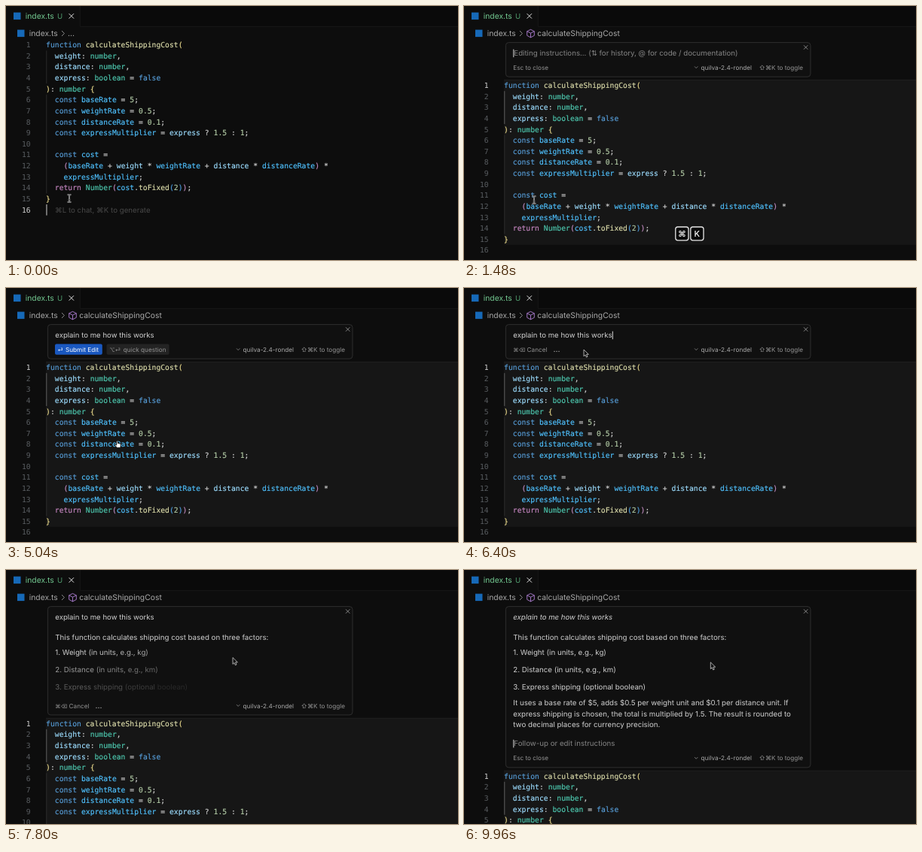
These frames come from a looping animation (600 px wide and 338 px high, 10000 ms). An HTML page:

```html
<!DOCTYPE html>
<html lang="en">
<head>
<meta charset="utf-8">
<title>Inline code question</title>
<style>
html, body { margin: 0; width: 100%; height: 100%; overflow: hidden; background: #0d0d0d; }
svg { display: block; width: 100vw; height: 100vh; }
text { white-space: pre; font-family: Inter, "DejaVu Sans", sans-serif; text-rendering: geometricPrecision; }
.code { font: 9.725px "DejaVu Sans Mono", monospace; stroke-width: 0.15; }
.body { font-size: 9.72px; fill: #d0d0d0; }
.small { font-size: 8.2px; fill: #929292; }
.glyph { font-size: 7.3px; fill: #929292; }
.tab { font-size: 10.35px; fill: #a9a9a9; }
</style>
</head>
<body>
<svg id="stage" viewBox="0 0 600 338"></svg>
<script>
const LOOP = 10000, STEP = 40;
const CHAR = 5.855, ROW = 14.62, LEFT = 53.1, TOP = 44.7;
const T = { grab: 120, top: 520, keys: 960, open: 1100, keysOff: 2160, type: 2870, hover: 4800, ask: 5960, answer: 6953, done: 8940 };
const KEY_MS = 60, CPS = 190, FADE = 500;
const PROMPT = "explain to me how this works";

const SRC = `function calculateShippingCost(
  weight: number,
  distance: number,
  express: boolean = false
): number {
  const baseRate = 5;
  const weightRate = 0.5;
  const distanceRate = 0.1;
  const expressMultiplier = express ? 1.5 : 1;

  const cost =
    (baseRate + weight * weightRate + distance * distanceRate) *
    expressMultiplier;
  return Number(cost.toFixed(2));
}
`.split("\n");

const ANSWER = [
  [89.2, "This function calculates shipping cost based on three factors:"],
  [110, "1. Weight (in units, e.g., kg)"],
  [132.6, "2. Distance (in units, e.g., km)"],
  [155.3, "3. Express shipping (optional boolean)"],
  [177, "It uses a base rate of $5, adds $0.5 per weight unit and $0.1 per distance unit. If"],
  [191.3, "express shipping is chosen, the total is multiplied by 1.5. The result is rounded to"],
  [205.8, "two decimal places for currency precision."]
];

function el(parent, tag, attrs = {}, text) {
  const n = document.createElementNS("http://www.w3.org/2000/svg", tag);
  for (const k in attrs) n.setAttribute(k, attrs[k]);
  if (text !== undefined) n.textContent = text;
  parent.appendChild(n);
  return n;
}
const group = p => el(p, "g");
const rect = (p, x, y, width, height, fill, more) => el(p, "rect", { x, y, width, height, fill, ...more });
const path = (p, d, stroke, more) => el(p, "path", { d, stroke, fill: "none", ...more });
const label = (p, x, y, cls, text, more) => el(p, "text", { x, y, class: cls, ...more }, text);
const show = (n, on) => n.setAttribute("display", on ? "inline" : "none");
const shift = (n, x, y) => n.setAttribute("transform", `translate(${x} ${y})`);
const clamp = v => Math.max(0, Math.min(1, v));

const svg = document.getElementById("stage");
rect(svg, 0, 0, 600, 338, "#0d0d0d");

// Code pane
const code = group(svg);
const region = group(code);
rect(region, 53, TOP, 547, ROW * 15, "#161616");
path(region, `M53 ${TOP}H600`, "#242424", { "stroke-width": 0.8 });
const marks = SRC.map((s, i) =>
  rect(code, LEFT, TOP + i * ROW, (s.length + (i < 14 ? 1 : 0)) * CHAR, ROW + 0.1, "#264f78"));
const guide = (a, b) => path(code, `M53.8 ${TOP + a * ROW}V${TOP + b * ROW}`, "#2e2e2e", { "stroke-width": 0.9 });
const params = guide(1, 4);
guide(5, 14);

const RULES = /(\b(?:function|const|false)\b)|(\breturn\b)|(\b(?:number|boolean|Number)\b)|(\b(?:calculateShippingCost|toFixed)\b)|(\b(?:weight|distance|express)\b)|([a-z]\w+)|(\d[\d.]*)|[^]/g;
const TONES = ["#569cd6", "#c586c0", "#4ec9b0", "#dcdcaa", "#9cdcfe", "#4fc1ff", "#b5cea8"];
const BRACKETS = ["#efdf8e", "#c78fc6", "#4fa3e8"];
let depth = 0;
function tone(m) {
  if ("({".includes(m[0])) return BRACKETS[depth++];
  if (")}".includes(m[0])) return BRACKETS[--depth];
  const i = m.slice(1).findIndex(Boolean);
  return i < 0 ? "#d4d4d4" : TONES[i];
}
const numbers = SRC.map((s, i) => {
  const y = TOP + i * ROW + 10.5;
  const line = label(code, LEFT, y, "code", "");
  for (const m of s.matchAll(RULES)) {
    const fill = tone(m);
    el(line, "tspan", { fill, stroke: fill }, m[0]);
  }
  return label(code, 32.6, y, "code", i + 1, { "text-anchor": "end" });
});
const hint = label(code, 65, TOP + 15 * ROW + 10.6, "body", "⌘L to chat, ⌘K to generate", { style: "fill:#484848" });
const bar = rect(code, 53.4, 0, 1.1, ROW, "#bdbdbd");

// Tab and breadcrumb
rect(svg, 98, 0, 502, 27, "#0a0a0a");
path(svg, "M98.3 0V27.3H600", "#1b1b1b", { "stroke-width": 0.8 });
rect(svg, 10, 8.6, 9.5, 9.5, "#1669b8");
label(svg, 25.7, 17, "tab", "index.ts", { style: "fill:#73c991" });
label(svg, 68, 16.6, "tab", "U", { style: "fill:#4f9a6c;font-size:9.6px" });
path(svg, "M83.6 10.2l6.4 6.4M90 10.2l-6.4 6.4", "#e0e0e0");
rect(svg, 15, 31.6, 9.5, 9.5, "#1669b8");
label(svg, 30.7, 40, "tab", "index.ts");
path(svg, "M74 33l3.4 3.5-3.4 3.5", "#999", { "stroke-width": 0.9 });
const dots = label(svg, 82, 40, "tab", "...");
const crumb = group(svg);
path(crumb, "M88.5 31.3l4.8 2.4v5.6l-4.8 2.6-4.8-2.6v-5.6zM83.7 33.7l4.8 2.4 4.8-2.4M88.5 36.1v5.8", "#b180d7", { "stroke-width": 0.9 });
label(crumb, 97.3, 40, "tab", "calculateShippingCost");

// Prompt box
const box = group(svg);
const frame = rect(box, 55.4, 48.6, 404.6, 45.4, "#101010", { rx: 4, stroke: "#323232", "stroke-width": 0.9 });
path(box, "M451 52.3l5.4 5.4M456.4 52.3l-5.4 5.4", "#a0a0a0", { "stroke-width": 0.8 });
const empty = label(box, 66.3, 66.4, "body", "Editing instructions... (⇅ for history, @ for code / documentation)", { style: "fill:#858585" });
const typed = label(box, 65.3, 66.4, "body", "", { style: "font-size:9.6px" });
const words = [];
let count = 0;
const lines = ANSWER.map(([y, s]) => {
  const line = { y, at: T.answer + count / CPS * 1000 };
  const t = label(box, 65.3, y + 3.4, "body", "");
  for (const w of s.match(/\S+ ?/g)) {
    words.push({ node: el(t, "tspan", {}, w), at: T.answer + count / CPS * 1000 });
    count += w.length;
  }
  return line;
});
const follow = label(box, 66.3, 234.4, "body", "Follow-up or edit instructions", { style: "fill:#858585" });
const caret = rect(box, 0, 0, 1, 10.6, "#d8d8d8");

// Footer of the prompt box, drawn around y = 0
const foot = group(box);
const esc = label(foot, 65.3, 3, "small", "Esc to close");
const actions = group(foot);
rect(actions, 65, -7.4, 62.8, 14.4, "#1a58c0", { rx: 2 });
label(actions, 68.6, 3, "glyph", "⏎", { style: "fill:#fff" });
label(actions, 79, 3, "small", "Submit Edit", { style: "fill:#fff" });
const hover = rect(actions, 133.6, -7.4, 83, 14.4, "#232323", { rx: 2 });
label(actions, 137.3, 3, "glyph", "⌥⏎");
label(actions, 155.8, 3, "small", "quick question");
const cancel = group(foot);
label(cancel, 65.3, 3, "glyph", "⌘⌫");
label(cancel, 83.6, 3, "small", "Cancel");
label(cancel, 118.4, 3, "small", "...", { style: "fill:#b5b5b5;font-size:10.5px" });
path(foot, "M306 -1.4l2.2 2.3 2.2-2.3", "#888", { "stroke-width": 0.8 });
label(foot, 382, 3, "small", "quilva-2.4-rondel", { "text-anchor": "end", style: "fill:#a8a8a8" });
label(foot, 450, 3, "small", "⇧⌘K to toggle", { "text-anchor": "end" });

// Key caps
const keys = group(svg);
["⌘", "K"].forEach((k, i) => {
  rect(keys, 280.8 + i * 20, 294, 17.2, 17.8, "#0a0a0a", { rx: 3, stroke: "#e8e8e8", "stroke-width": 1.3 });
  label(keys, 289.4 + i * 20, 306.9, "", k, { "text-anchor": "middle", fill: "#fff", "font-size": 11, "font-weight": 500 });
});

// Pointers
const beam = group(svg), hand = group(svg), arrow = group(svg);
const I = "M-2.4 -4.8Q0 -4.8 0 -3.2V3.2Q0 4.8 -2.4 4.8M2.4 -4.8Q0 -4.8 0 -3.2M0 3.2Q0 4.8 2.4 4.8M-1.2 1.6H1.2";
path(beam, I, "#d0d0d0", { "stroke-width": 1.7 });
path(beam, I, "#111", { "stroke-width": 0.6 });
path(hand, "M-1.7 -4q.9-.9 1.6 0v2.6l3 .6q1.2.4 1 1.6l-.7 3.7h-4.4l-2.5-3.2q-.3-1.3 1-.9l1 .8z", "#111", { fill: "#fff", "stroke-width": 0.8 });
path(arrow, "M0 0V8.8L2 7l1.4 3.1 1.6-.7L3.6 6.3h2.8z", "#d0d0d0", { fill: "#111", "stroke-width": 0.8, "stroke-linejoin": "round" });

const EASE = { s: p => p * p * (3 - 2 * p), i: p => p * p, o: p => 1 - (1 - p) * (1 - p) };
const ROUTE = [
  [0, 84, 256, "s"], [T.grab, 84, 256, "s"], [580, 58, 54, "s"], [720, 58, 54, "s"], [1380, 93, 258, "s"],
  [T.hover, 93, 258, "s"], [5040, 148.5, 208, "i"], [5480, 159, 82, "o"], [6560, 159, 82, "s"],
  [7800, 301, 116.5, "s"], [8500, 327.3, 122.8, "s"], [LOOP, 327.3, 122.8, "s"]
];
function pointer(t) {
  const i = ROUTE.findIndex(k => k[0] > t);
  const [t0, x0, y0] = ROUTE[i - 1], [t1, x1, y1, e] = ROUTE[i];
  const p = EASE[e]((t - t0) / (t1 - t0));
  return [x0 + (x1 - x0) * p, y0 + (y1 - y0) * p];
}

function footY(t) {
  if (t >= T.done) return 250.4;
  const last = lines.filter(l => t >= l.at).pop();
  return last ? last.y + 25.2 : 81.8;
}

function draw(t) {
  const open = t >= T.open, done = t >= T.done, asked = t >= T.ask;
  const picking = t >= T.grab;
  const row = picking ? Math.round(14 * (1 - EASE.s(clamp((t - T.grab) / (T.top - T.grab))))) : 15;
  const fy = footY(t);

  shift(code, 0, open ? fy - 81.8 + 53.9 : 0);
  show(region, open);
  marks.forEach((m, i) => show(m, picking && !open && i >= row && i < 15));
  numbers.forEach((n, i) => n.setAttribute("fill", i === row ? "#d0d0d0" : "#595d61"));
  params.setAttribute("stroke", row < 4 ? "#686868" : "#2e2e2e");
  show(hint, !picking);
  show(bar, !open);
  bar.setAttribute("y", TOP + row * ROW);
  show(dots, !picking);
  show(crumb, picking);

  show(box, open);
  frame.setAttribute("height", fy + 12.4 - 48.6);
  shift(foot, 0, fy);
  const n = Math.max(0, Math.min(PROMPT.length, Math.floor((t - T.type) / KEY_MS) + 1));
  typed.textContent = PROMPT.slice(0, n);
  typed.setAttribute("font-style", done ? "italic" : "normal");
  show(empty, !n);
  show(follow, done);
  words.forEach(w => w.node.setAttribute("fill-opacity", t < w.at ? 0 : 0.06 + 0.94 * clamp((t - w.at) / FADE)));
  show(esc, !n || done);
  show(actions, n && !asked);
  show(hover, t >= T.hover + 160);
  show(cancel, asked && !done);

  // The caret restarts its blink after each edit or focus
  const edit = done ? T.done : asked ? T.ask : n ? T.type + (n - 1) * KEY_MS : T.open;
  show(caret, (t < T.answer || done) && (t - edit) % 1000 < 500);
  caret.setAttribute("x", n && !done ? 65.5 + typed.getComputedTextLength() : 65.3);
  caret.setAttribute("y", done ? 225.8 : 57.6);

  show(keys, t >= T.keys && t < T.keysOff + 200);
  keys.setAttribute("opacity", Math.min(clamp((t - T.keys) / 100 + 0.3), 1 - clamp((t - T.keysOff) / 200)));

  const [x, y] = pointer(t);
  [beam, hand, arrow].forEach(c => shift(c, x, y));
  show(beam, t < T.type);
  show(hand, t >= T.hover && t < T.ask);
  show(arrow, asked);
}

let start;
function tick(now) {
  if (start === undefined) start = now;
  draw(Math.floor((now - start) % LOOP / STEP) * STEP);
  requestAnimationFrame(tick);
}
draw(0);
requestAnimationFrame(tick);
</script>
</body>
</html>
```
